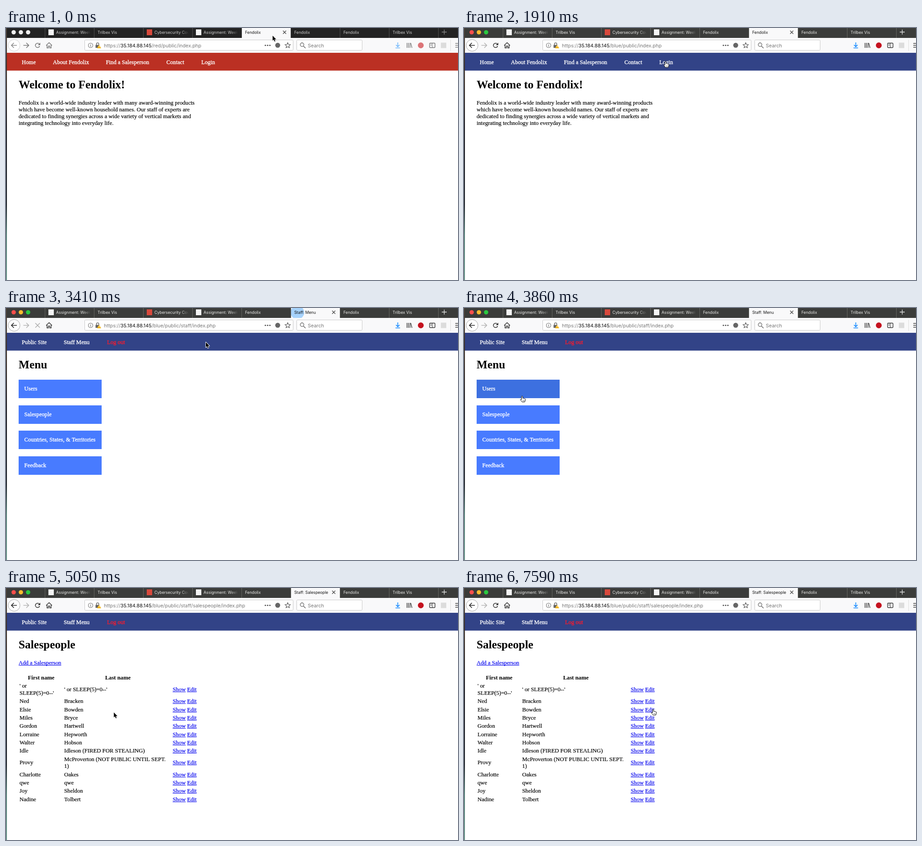
These frames come from a looping animation (1002 by 559 pixels, 8 s). An HTML page with a canvas:

```html
<!DOCTYPE html>
<html lang="en">
<head>
<meta charset="utf-8">
<title>Browser session</title>
<style>
html, body { margin: 0; width: 100%; height: 100%; overflow: hidden; background: #fff; }
canvas { display: block; width: 1002px; height: 559px; }
</style>
</head>
<body>
<canvas id="stage" width="1002" height="559"></canvas>
<script>
const ctx = document.getElementById('stage').getContext('2d');
const LOOP = 8000, TAU = Math.PI * 2;
const SERIF = '"Liberation Serif", "Times New Roman", serif';
const SANS = 'Inter, Roboto, sans-serif';
const BODY = '12.7px ' + SERIF, BOLD = 'bold 12.7px ' + SERIF, HEAD = 'bold 25.4px ' + SERIF;
const TAB = '8.75px ' + SANS, FIELD = '10.85px ' + SANS;
const BRAND = 'Fendolix', HOST = '35.184.88.145';

// [start, end, steps]: the picture is held between steps
const bursts = [
  [180, 830, 5], [1160, 1910, 6], [2510, 3410, 7], [3560, 4010, 4],
  [4310, 5050, 6], [5350, 5650, 3], [5950, 6550, 5], [6850, 7590, 6]
];
// pointer way points: [time, x, y]
const path = [
  [30, 591, 17], [660, 663, 17], [1010, 663, 17], [1460, 575, 66], [1910, 447, 74],
  [2360, 447, 74], [2810, 443, 76], [3410, 443, 76], [3860, 129, 195], [4010, 81, 252],
  [4465, 81, 252], [5050, 239, 276], [5200, 239, 276], [5500, 340, 301], [5650, 352, 288],
  [5800, 352, 288], [6100, 309, 269], [6550, 388, 290], [6700, 388, 290], [7585, 419.5, 268.5]
];
const homeNav = [['Home', 35], ['About ' + BRAND, 104], ['Find a Salesperson', 221.5], ['Contact', 355.5], ['Login', 433]];
const staffNav = [['Public Site', 35], ['Staff Menu', 128], ['Log out', 224]];
const intro = [
  BRAND + ' is a world-wide industry leader with many award-winning products',
  'which have become well-known household names. Our staff of experts are',
  'dedicated to finding synergies across a wide variety of vertical markets and',
  'integrating technology into everyday life.'
];
const menu = ['Users', 'Salespeople', 'Countries, States, & Territories', 'Feedback'];
const people = [
  ["' or|SLEEP(5)=0--'", "' or SLEEP(5)=0--'"],
  ['Ned', 'Bracken'], ['Elsie', 'Bowden'], ['Miles', 'Bryce'], ['Gordon', 'Hartwell'],
  ['Lorraine', 'Hepworth'], ['Walter', 'Hobson'], ['Idle', 'Idleson (FIRED FOR STEALING)'],
  ['Provy', 'McProverton (NOT PUBLIC UNTIL SEPT.|1)'],
  ['Charlotte', 'Oakes'], ['qwe', 'qwe'], ['Joy', 'Sheldon'], ['Nadine', 'Tolbert']
];

function heldTime(t) {
  let held = 0;
  for (const [a, b, n] of bursts)
    for (let i = 0; i < n; i++) {
      const at = a + i * (b - a) / (n - 1);
      if (at <= t + 0.5) held = at;
    }
  return held;
}

function pointerAt(t) {
  if (t <= path[0][0]) return path[0].slice(1);
  for (let i = 1; i < path.length; i++) {
    const [t0, x0, y0] = path[i - 1], [t1, x1, y1] = path[i];
    if (t <= t1) {
      const k = (t - t0) / (t1 - t0);
      return [x0 + (x1 - x0) * k, y0 + (y1 - y0) * k];
    }
  }
  return path[path.length - 1].slice(1);
}

function box(x, y, w, h, color) {
  ctx.fillStyle = color;
  ctx.fillRect(x, y, w, h);
}
function disc(x, y, r, color) {
  ctx.fillStyle = color;
  ctx.beginPath();
  ctx.arc(x, y, r, 0, TAU);
  ctx.fill();
}
function ring(x, y, r, color, width = 1, a = 0, b = TAU) {
  ctx.strokeStyle = color;
  ctx.lineWidth = width;
  ctx.beginPath();
  ctx.arc(x, y, r, a, b);
  ctx.stroke();
}
function outline(d, color, width = 1.4) {
  ctx.strokeStyle = color;
  ctx.lineWidth = width;
  ctx.stroke(new Path2D(d));
}
function text(s, x, y, font, color, align = 'left') {
  ctx.font = font;
  ctx.textAlign = align;
  ctx.fillStyle = color;
  ctx.fillText(s, x, y);
  return ctx.measureText(s).width;
}
// body text with slightly thickened strokes
function pageText(s, x, y, color = '#000', weight = 0.2) {
  const w = text(s, x, y, BODY, color);
  ctx.strokeStyle = color;
  ctx.lineWidth = weight;
  ctx.strokeText(s, x, y);
  return w;
}
function link(s, x, y) {
  const w = pageText(s, x, y, '#0000ee');
  box(x, Math.round(y + 1), w, 1, '#0000ee');
}
function field(x, w) {
  ctx.beginPath();
  ctx.roundRect(x, 26.5, w, 23, 2);
  ctx.fillStyle = '#fff';
  ctx.fill();
  ctx.strokeStyle = '#c8c8c8';
  ctx.lineWidth = 1;
  ctx.stroke();
}

function drawTabs(s) {
  box(2, 0, 1000, 22, s.active ? '#3b3c3a' : '#232323');
  const lights = s.active ? ['#fc4e4b', '#fdbc2e', '#2ac840'] : ['#efefef', '#efefef', '#efefef'];
  lights.forEach((c, i) => disc(17 + i * 16, 9.5, 4.8, c));

  const names = ['Assignment: Week 9', 'Trilbex Vis', 'Cybersecurity Course', 'Assignment: Week 9', BRAND, BRAND, BRAND, 'Trilbex Vis'];
  const icons = { 0: '#f4f4f4', 2: '#d8493c', 3: '#f4f4f4' };
  const current = s.active ? 5 : 4;
  for (let i = 0; i < 9; i++) box(86 + i * 109, 0, 1, 22, s.active ? '#666762' : '#505050');

  names.forEach((name, i) => {
    const left = 86 + i * 109;
    if (i === current) return drawCurrentTab(left, s);
    if (icons[i]) box(left + 8, 3, 12, 13, icons[i]);
    const fade = ctx.createLinearGradient(left + 84, 0, left + 101, 0);
    const tone = s.active ? '235,235,233' : '205,205,205';
    fade.addColorStop(0, `rgba(${tone},1)`);
    fade.addColorStop(1, `rgba(${tone},0)`);
    text(name, left + (icons[i] ? 25 : 8), 12.8, TAB, fade);
  });
  outline('M966 9H977M971.5 3.5V14.5', s.active ? '#e6e6e6' : '#8a8a8a', 1.3);
}

function drawCurrentTab(left, s) {
  box(left + 1, 0, 108, 22, '#f9f9fa');
  if (s.burst) {
    ctx.save();
    ctx.beginPath();
    ctx.rect(left + 1, 0, 108, 22);
    ctx.clip();
    disc(left + 15, 10, s.burst === 1 ? 15 : 25, s.burst === 1 ? '#a6d2fb' : 'rgba(166,210,251,.35)');
    ctx.restore();
  }
  if (s.busy) box(left + 15, 8.5, 5, 2, '#777');
  text(s.title, left + (s.busy ? 25 : 8), 12.8, TAB, '#111');
  const cx = left + 95.5;
  outline(`M${cx - 3.5} 6l7 7m0 -7l-7 7`, '#444', 1.3);
}

function drawReload(mode, ink) {
  if (mode === 'slash') return outline('M65 34L74.5 43', '#555', 1.5);
  if (mode === 'stop') return outline('M65 33.5L75 43.5M75 33.5L65 43.5', '#aaa', 1.5);
  ring(70, 38.5, 4.8, ink, 1.6, 0.35, TAU - 0.9);
  ctx.fillStyle = ink;
  ctx.fill(new Path2D('M76 32.5V38H70.5Z'));
}

function drawToolbar(s) {
  const ink = s.active ? '#333' : '#777', soft = s.active ? '#b4b4b4' : '#777';
  box(2, 22, 1000, 33, '#f9f9fa');
  disc(18, 38.5, 13, '#fff');
  ring(18, 38.5, 13, s.active ? '#a5a5a5' : '#cfcfcf');
  outline('M24 38.5H12.5M17.5 33L12 38.5L17.5 44', s.active ? '#222' : '#888', 1.6);
  outline('M38.5 38.5H50M45 33L50.5 38.5L45 44', soft, 1.6);
  drawReload(s.reload, ink);
  outline('M89 38.8L95.5 32.5L102 38.8M91 38V44.3H94V40H97V44.3H100V38', ink, 1.5);

  field(174.5, 462);
  ring(187.5, 38.5, 5, '#777', 1.1);
  box(187, 37.8, 1.2, 3.6, '#666');
  box(187, 35.5, 1.2, 1.3, '#666');
  outline('M200.5 38V35.5a2.6 2.6 0 0 1 5.2 0V38', '#666', 1.4);
  box(198.5, 37.5, 8, 6.5, '#666');
  ctx.fillStyle = '#f3b51b';
  ctx.fill(new Path2D('M206.3 37.2L211 45H201.6Z'));
  box(205.8, 39.7, 1, 2.6, '#fff');

  let x = 217;
  x += text('https://', x, 42.5, FIELD, '#777');
  x += text(HOST, x, 42.5, FIELD, '#111');
  text(s.url, x, 42.5, FIELD, '#777');
  for (let i = 0; i < 3; i++) disc(575 + i * 5, 38.5, 1.6, '#555');
  disc(602.3, 38.3, 5.5, '#666');

  let star = '';
  for (let i = 0; i < 10; i++) {
    const r = i % 2 ? 2.8 : 6.2, a = i * TAU / 10 - TAU / 4;
    star += `${i ? 'L' : 'M'}${624.5 + r * Math.cos(a)} ${38.8 + r * Math.sin(a)}`;
  }
  outline(star + 'Z', '#555', 1.2);

  field(644.5, 145);
  ring(656.3, 37, 4, '#666', 1.3);
  outline('M659.2 40L664 44.8', '#666', 1.5);
  text('Search', 669, 42.5, FIELD, '#777');

  outline('M868.5 32V41M864.5 37.5L868.5 41.5L872.5 37.5M863.5 44.3H873.5', s.active ? '#0a84ff' : '#6cb5fb', 1.6);
  outline('M889 33V44M892.3 33V44M895.6 33V44M897.3 33.3L900 44', ink, 1.4);
  disc(919.5, 38.5, 6.5, s.active ? '#c4121f' : '#dc7478');
  ctx.strokeStyle = ink;
  ctx.lineWidth = 1.4;
  ctx.beginPath();
  ctx.roundRect(939, 33.5, 12, 10, 1.5);
  ctx.stroke();
  outline('M945 33.5V43.5M941 36H943.5M941 38.5H943.5', ink, 1);
  box(964, 32.5, 12, 12, '#dcdcdc');
  box(985, 26, 1, 25, '#dedede');
  for (let i = 0; i < 3; i++) box(996, 33.5 + i * 4.2, 6, 1.4, ink);
}

function drawNav(s) {
  box(2, 55, 1000, 39.5, s.active ? '#324387' : '#bb3023');
  for (const [label, x] of s.page === 'home' ? homeNav : staffNav)
    pageText(label, x, 79.5, label === 'Log out' ? '#fa1b2c' : '#fff', 0.35);
}

function drawHome() {
  text('Welcome to ' + BRAND + '!', 28, 133.5, HEAD, '#000');
  intro.forEach((line, i) => pageText(line, 28, 170.3 + i * 15));
}

const menuTop = i => 159 + i * 56.7;
const inside = (px, py, x, y, w, h) => px >= x && px <= x + w && py >= y && py <= y + h;

function drawMenu(px, py) {
  let over = false;
  text('Menu', 28, 133.5, HEAD, '#000');
  menu.forEach((label, i) => {
    const y = menuTop(i), hot = inside(px, py, 28, y, 184, 40.7);
    over = over || hot;
    box(28, Math.round(y), 184, 41, hot ? '#3d70e0' : '#487bff');
    pageText(label, 40.5, y + 24, '#fff', 0.35);
  });
  return over;
}

function drawPeople(px, py) {
  let over = false, y = 208;
  text('Salespeople', 28, 133.5, HEAD, '#000');
  link('Add a Salesperson', 28, 170.3);
  text('First name', 78, 202.8, BOLD, '#000', 'center');
  text('Last name', 248, 202.8, BOLD, '#000', 'center');
  for (const row of people) {
    const cells = row.map(c => c.split('|'));
    const lines = Math.max(cells[0].length, cells[1].length);
    const h = lines > 1 ? 34 : 18.35, mid = y + h / 2;
    cells.forEach((cell, col) => cell.forEach((line, i) =>
      pageText(line, col ? 129 : 30, mid + 4 + (i - (cell.length - 1) / 2) * 15.5)));
    link('Show', 369.5, mid + 4);
    link('Edit', 401.5, mid + 4);
    over = over || inside(px, py, 369.5, mid - 7, 29, 14) || inside(px, py, 401.5, mid - 7, 21.5, 14);
    y += h;
  }
  return over;
}

function drawPointer(x, y, hand) {
  ctx.save();
  ctx.translate(x, y);
  ctx.lineJoin = 'round';
  if (hand) {
    const shape = new Path2D('M-1.5 1Q0 -.6 1 1V5.2Q2.5 4.2 3.3 5.7Q4.8 4.9 5.3 6.3Q7 5.8 7 7.5V10L5.5 13.5H-.3L-4 8.5Q-4 6.8 -2.4 7.5L-1.5 8.5Z');
    ctx.fillStyle = '#fff';
    ctx.fill(shape);
    ctx.strokeStyle = '#111';
    ctx.lineWidth = 1;
    ctx.stroke(shape);
    outline('M1.2 9.5V11.8M3 9.5V11.8M4.8 9.5V11.8', '#333', 0.7);
  } else {
    const shape = new Path2D('M0 0V11L2.5 8.8L4.4 13L6.2 12.2L4.4 8.2H8Z');
    ctx.strokeStyle = '#fff';
    ctx.lineWidth = 1.8;
    ctx.stroke(shape);
    ctx.fillStyle = '#000';
    ctx.fill(shape);
  }
  ctx.restore();
}

function stateAt(t) {
  const within = (a, b) => t >= a && t < b;
  const active = t >= 600;
  const file = t >= 4300 ? '/staff/salespeople' : t >= 3100 ? '/staff' : '';
  return {
    active,
    url: (active ? '/blue' : '/red') + '/public' + file + '/index.php',
    title: t >= 4300 ? 'Staff: Salespeople' : t >= 3100 ? 'Staff: Menu' : BRAND,
    page: t >= 4450 ? 'people' : t >= 3250 ? 'menu' : 'home',
    busy: within(2950, 3400) || within(4300, 4450),
    burst: within(3400, 3550) || within(4450, 4600) ? 1 : within(3550, 3700) || within(4600, 4750) ? 2 : 0,
    reload: within(3100, 3250) || within(4300, 4450) ? 'slash'
      : within(3250, 3700) || within(4450, 4750) ? 'stop' : 'reload'
  };
}

function drawDesktopEdge() {
  const g = ctx.createLinearGradient(0, 0, 0, 559);
  [[0, '#4a4038'], [0.2, '#33271f'], [0.4, '#0c0c14'], [0.7, '#10161e'], [0.82, '#4d7a72'], [1, '#5f8f82']]
    .forEach(([at, c]) => g.addColorStop(at, c));
  box(0, 0, 2, 559, g);
}

function draw(time) {
  const t = heldTime(time), s = stateAt(t), [px, py] = pointerAt(t);
  box(0, 0, 1002, 559, '#fff');
  drawDesktopEdge();
  drawTabs(s);
  drawToolbar(s);
  drawNav(s);
  let hand;
  if (s.page === 'home') {
    drawHome();
    hand = !s.busy && inside(px, py, 433, 64, 32, 22);
  } else {
    hand = (s.page === 'menu' ? drawMenu : drawPeople)(px, py);
  }
  drawPointer(px, py, hand);
}

function tick() {
  draw(performance.now() % LOOP);
  requestAnimationFrame(tick);
}
tick();
</script>
</body>
</html>
```
